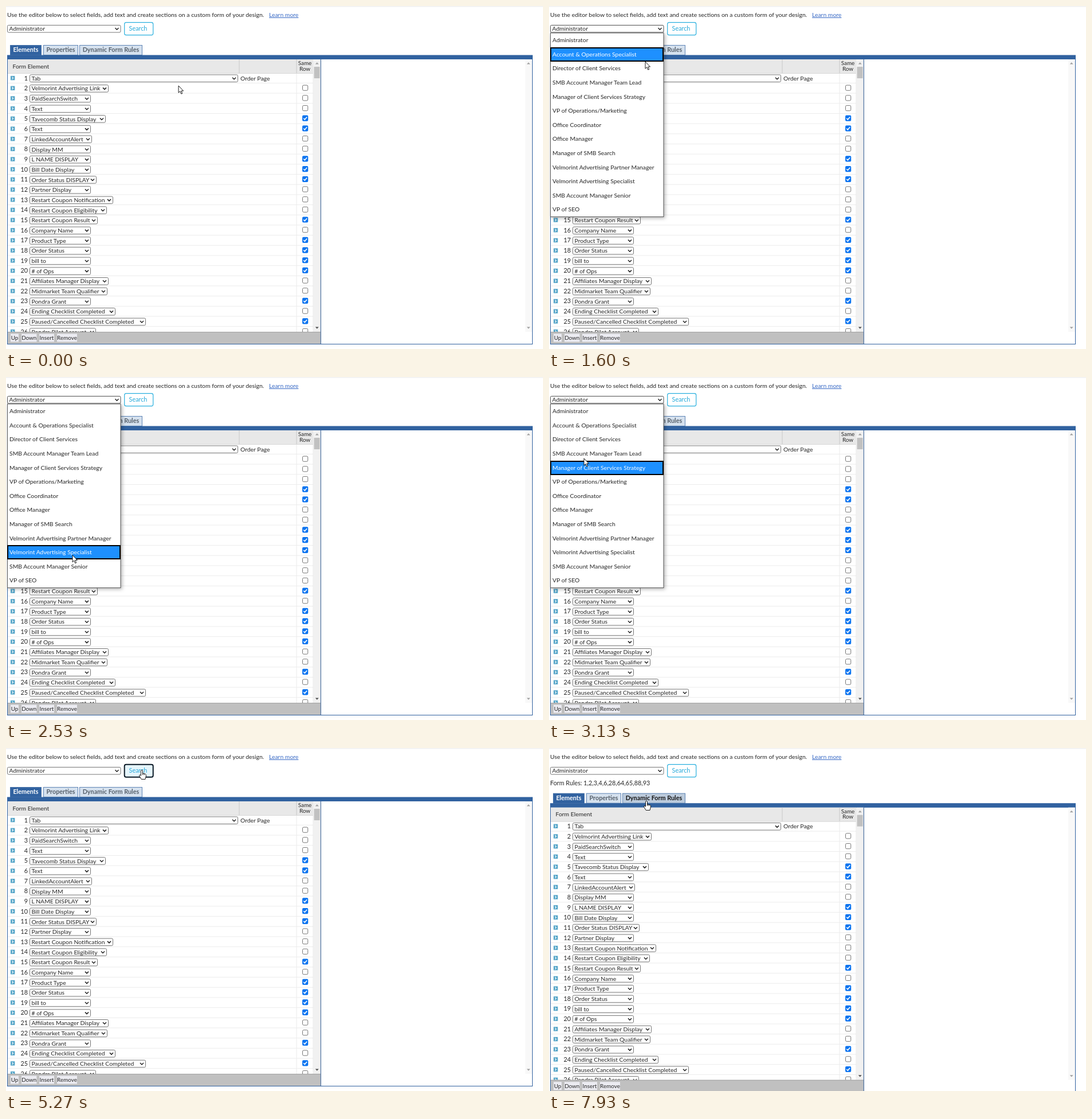
These frames come from a looping animation (937 by 598 pixels, 8 s). An HTML page:

```html
<!DOCTYPE html>
<html lang="en">
<head>
<meta charset="utf-8">
<title>Form editor</title>
<style>
html, body { margin: 0; width: 100%; height: 100%; overflow: hidden; background: #fff; }
svg { display: block; font: 10.4px Lato, "Open Sans", sans-serif; }
text { fill: #262626; white-space: pre; }
.tab text { font-size: 10.8px; font-weight: bold; text-anchor: middle; fill: #56606b; }
.mid { text-anchor: middle; }
.end { text-anchor: end; }
.big { font-size: 10.8px; }
.small { font-size: 9.9px; }
#menu > :first-child { filter: drop-shadow(2px 2px 3px rgba(0, 0, 0, .3)); }
</style>
</head>
<body>
<svg id="stage" width="937" height="598" viewBox="0 0 937 598"></svg>
<script>
const BLUE = '#3162a0';
const rect = (x, y, w, h, fill, more = '') =>
  `<rect x="${x}" y="${y}" width="${w}" height="${h}" fill="${fill}" ${more}/>`;
const text = (x, y, s, more = '') => `<text x="${x}" y="${y}" ${more}>${s}</text>`;
const path = (d, stroke, width, fill = 'none') =>
  `<path d="${d}" stroke="${stroke}" stroke-width="${width}" fill="${fill}"/>`;
const select = (x, y, right, label, id = '') =>
  rect(x + .5, y + .5, right - x - 1, 12.5, '#fff', `rx="2" stroke="#767676" ${id}`) +
  text(x + 3.5, y + 10.4, label) +
  path(`M${right - 10} ${y + 5.3}l3 3 3-3`, '#222', 1.5);
const arrow = (x, y, dir, fill) => `<path d="M${x - 3} ${y + dir * 1.5}h6l-3 ${-dir * 3.2}z" fill="${fill}"/>`;

// label, right edge of its select, checked
const rows = [
  ['Tab', 405], ['Velmorint Advertising Link', 179], ['PaidSearchSwitch'], ['Text'],
  ['Tavecomb Status Display', 174, 1], ['Text', 0, 1], ['LinkedAccountAlert', 150], ['Display MM'],
  ['L NAME DISPLAY', 0, 1], ['Bill Date Display', 0, 1], ['Order Status DISPLAY', 158, 1],
  ['Partner Display'], ['Restart Coupon Notification', 187], ['Restart Coupon Eligibility', 176],
  ['Restart Coupon Result', 160, 1], ['Company Name'], ['Product Type', 0, 1], ['Order Status', 0, 1],
  ['bill to', 0, 1], ['# of Ops', 0, 1], ['Affiliates Manager Display', 179],
  ['Midmarket Team Qualifier', 177], ['Pondra Grant', 0, 1], ['Ending Checklist Completed', 191],
  ['Paused/Cancelled Checklist Completed', 244, 1], ['Pondra Pilot Account', 157]
];
const roles = ['Administrator', 'Account &amp; Operations Specialist', 'Director of Client Services',
  'SMB Account Manager Team Lead', 'Manager of Client Services Strategy', 'VP of Operations/Marketing',
  'Office Coordinator', 'Office Manager', 'Manager of SMB Search', 'Velmorint Advertising Partner Manager',
  'Velmorint Advertising Specialist', 'SMB Account Manager Senior', 'VP of SEO'];
const ROLE_H = 24.6, ROLE_TOP = 47.2;

function row([label, right, on], i) {
  const y = 125.6 + 17.68 * i, c = y - .7;
  let s = rect(8, y - 3.7, 7.4, 7.4, '#55a5c8') + path(`M10.4 ${y - 2}l2.2 2-2.2 2`, '#fff', 1.1) +
    text(38, y + 3.9, i + 1, 'class="end big"') + select(41, y - 6.2, right || 148, label) +
    rect(3, y + 8.3, 533, 1, '#ececec');
  if (!i) return s + text(409, y + 3.9, 'Order Page');
  return s + (on
    ? rect(517, c - 5, 10.2, 10.2, '#0b74f0', 'rx="2"') + path(`M519.2 ${c + .2}l2.1 2.2 3.8-4.6`, '#fff', 1.6)
    : rect(517.5, c - 4.5, 9.2, 9.2, '#fff', 'rx="2" stroke="#767676"'));
}
const tab = (x, w, label, fill, id) => `<g class="tab" id="${id}">` +
  rect(x + .5, 68.5, w - 1, 17, fill, `stroke="${BLUE}" stroke-opacity=".75"`) +
  text(x + w / 2, 80.4, label) + '</g>';
const scrollbar = (x, track, down) => rect(x, 93, 12, 475, track) +
  arrow(x + 5.7, 100, 1, '#a0a0a0') + arrow(x + 5.7, 561, -1, down);
const button = (x, w, label) => rect(x, 571.5, w, 14, '#ececf2') +
  text(x + w / 2, 582.3, label, 'class="mid small"');

const panel = tab(7, 55, 'Elements', BLUE, 'tabA') + tab(65, 61, 'Properties', '#d5e1ee', 'tabB') +
  tab(128, 110, 'Dynamic Form Rules', '#d5e1ee', 'tabC') +
  rect(2.5, 92.5, 916, 497, '#fff', `stroke="${BLUE}"`) + rect(2, 85.5, 917, 7.5, BLUE) +
  rect(3, 93, 533, 24.5, '#e8e8e8') + rect(3, 117, 533, 1, '#d8d8d8') +
  text(11.5, 108.7, 'Form Element') +
  text(521.5, 103.2, 'Same', 'class="mid small"') +
  text(521.5, 112.7, 'Row', 'class="mid small"') +
  rect(406.5, 93, 1, 24, '#c8c8c8') + rect(506.5, 93, 1, 24, '#c8c8c8') +
  '<clipPath id="list"><path d="M3 117H537V568H3z"/></clipPath><g clip-path="url(#list)">' +
  rows.map(row).join('') + rect(506.5, 118, 1, 450, '#ececec') + '</g>' +
  rect(535.5, 93, 1, 475, '#e4e4e4') + scrollbar(537, '#f1f1f1', '#505050') +
  rect(537.5, 106, 10, 20, '#c1c1c1') + scrollbar(906, '#f8f8f8', '#a0a0a0') +
  rect(3, 568, 546, 21, '#c0c0c0') + rect(3, 568, 546, 1, '#a2a2a2') +
  button(8, 14, 'Up') + button(27, 26.5, 'Down') + button(58, 26, 'Insert') + button(89, 35, 'Remove') +
  rect(548.7, 93, 1.2, 496, '#4a6f9f');

const menu = rect(2.5, 47, 197.5, 320.5, '#fff', 'stroke="#555"') +
  rect(3, 0, 196, 23, '#1e90ff', 'id="mark" stroke="#000" stroke-width="2"') +
  roles.map((r, i) => text(6, ROLE_TOP + ROLE_H * (i + .5) + 3.7, r, 'class="role"')).join('');

stage.innerHTML = rect(0, 0, 937, 1.6, '#f1f1f1') +
  text(2, 18.8, 'Use the editor below to select fields, add text and create sections on a custom form of your design.') +
  text(459, 18.8, 'Learn more', 'style="fill:#3a6bc6;text-decoration:underline"') +
  select(2, 33, 200.5, 'Administrator', 'id="roleBox"') +
  rect(206.7, 28.7, 50, 22, '#fff', 'id="searchBox" rx="3"') +
  text(230.5, 43.4, 'Search', 'class="mid big" style="fill:#25a9da"') +
  text(2, 65.4, 'Form Rules: 1,2,3,4,6,28,64,65,88,93', 'id="rules" class="big"') +
  `<g id="panel">${panel}</g><g id="menu">${menu}</g><g id="cursor">` +
  path('M0 0V12.2L2.8 9.6 4.7 14.2 6.7 13.4 4.8 9H8.5Z', '#000', .9, '#fff') +
  path('M-1.5 1.2Q0-.8 1.5 1.2V6l5 1.4Q7.6 8 7.4 11L6 16.5H-.8L-4.4 10.6Q-4.6 8.4-2.8 9L-1.5 10.2ZM1.5 6V9M4 6.8V9.2', '#000', .9, '#fff') +
  path('M-2.8-5.6H-.8L0-5 .8-5.6H2.8M0-5V5.4M-2.8 6H-.8L0 5.4 .8 6H2.8', '#222', 1) + '</g>';
document.querySelector('#tabA text').style.fill = '#fff';

// pointer keys: time, x, y
const keys = [
  [0, 301, 139], [100, 301, 139], [330, 232, 84], [600, 163, 34], [790, 163, 34], [930, 163, 37],
  [1070, 163, 37], [1270, 212, 58], [1470, 186, 80], [1600, 168, 97], [1870, 151, 182], [1933, 148, 197],
  [2000, 146, 212], [2400, 120, 290], [2733, 110, 341], [2800, 108, 344], [2867, 98, 310], [3000, 67, 190],
  [3133, 61, 142], [3400, 51, 72], [3533, 48, 63], [4470, 48, 63], [4667, 140, 52], [4867, 234, 35],
  [5000, 234, 35], [5133, 237, 38], [5550, 237, 38], [5670, 188, 50], [5800, 112, 59], [6000, 80, 67],
  [6400, 68, 61], [6740, 68, 61], [7133, 112, 72], [7600, 170, 92], [8000, 170, 92]
];
function pointer(t) {
  const i = Math.max(1, keys.findIndex(k => k[0] >= t));
  const [a, x, y] = keys[i - 1], [b, u, v] = keys[i];
  const f = Math.max(0, t - a) / (b - a);
  return [x + (u - x) * f, y + (v - y) * f];
}
const get = id => document.getElementById(id);
const set = (el, attrs) => { for (const k in attrs) el.setAttribute(k, attrs[k]); };
const STEP = 1000 / 15, roleTexts = document.querySelectorAll('.role');

function draw(now) {
  const t = Math.floor((now % 8000 + 8) / STEP) * STEP % 8000;
  const [x, y] = pointer(t);
  const open = t > 1050 && t < 4250, found = t > 5380, focus = t > 5250 && t < 7850;
  const shift = found ? 10.7 : 0;
  const over = (l, top, r, b) => !open && x > l && x < r && y > top && y < b;
  const overRole = over(2, 33, 200, 47), overSearch = over(206, 28, 257, 51);
  const onTab = (l, r) => over(l, 68 + shift, r, 86 + shift);

  get('panel').setAttribute('transform', `translate(0 ${shift})`);
  get('rules').style.display = found ? '' : 'none';
  const roleFocus = t > 4250 && t < 5250;
  set(get('roleBox'), {
    stroke: roleFocus ? '#000' : overRole || open ? '#4f4f4f' : '#767676',
    'stroke-width': roleFocus ? 2 : 1
  });
  set(get('searchBox'), {
    fill: focus || overSearch ? '#e5f5fc' : t > 7850 && t < 7910 ? '#f2fafe' : '#fff',
    stroke: focus ? '#0b1a26' : '#2bb0de',
    'stroke-width': focus ? 2 : 1.2
  });
  let hand = overSearch;
  for (const [id, l, r] of [['tabB', 65, 126], ['tabC', 128, 238]]) {
    const hot = onTab(l, r) || id == 'tabC' && t > 7550;
    hand = hand || hot;
    get(id).firstChild.setAttribute('fill', hot ? '#bccbdc' : '#d5e1ee');
    get(id).lastChild.style.fill = hot ? '#151515' : '';
  }

  // the highlighted role trails the pointer by one step
  get('menu').style.display = open ? '' : 'none';
  const pick = Math.max(0, Math.min(12, Math.floor((pointer(t - STEP)[1] - ROLE_TOP) / ROLE_H)));
  get('mark').setAttribute('y', Math.round(ROLE_TOP + ROLE_H * pick) + 1);
  roleTexts.forEach((el, i) => el.style.fill = i == pick ? '#fff' : '');

  const shape = hand ? 1 : found && over(2, 54, 184, 66.5) ? 2 : 0;
  get('cursor').setAttribute('transform', `translate(${x} ${y})`);
  [...get('cursor').children].forEach((el, i) => el.style.display = i == shape ? '' : 'none');
}
const start = performance.now();
(function tick() {
  draw(performance.now() - start);
  requestAnimationFrame(tick);
})();
</script>
</body>
</html>
```
